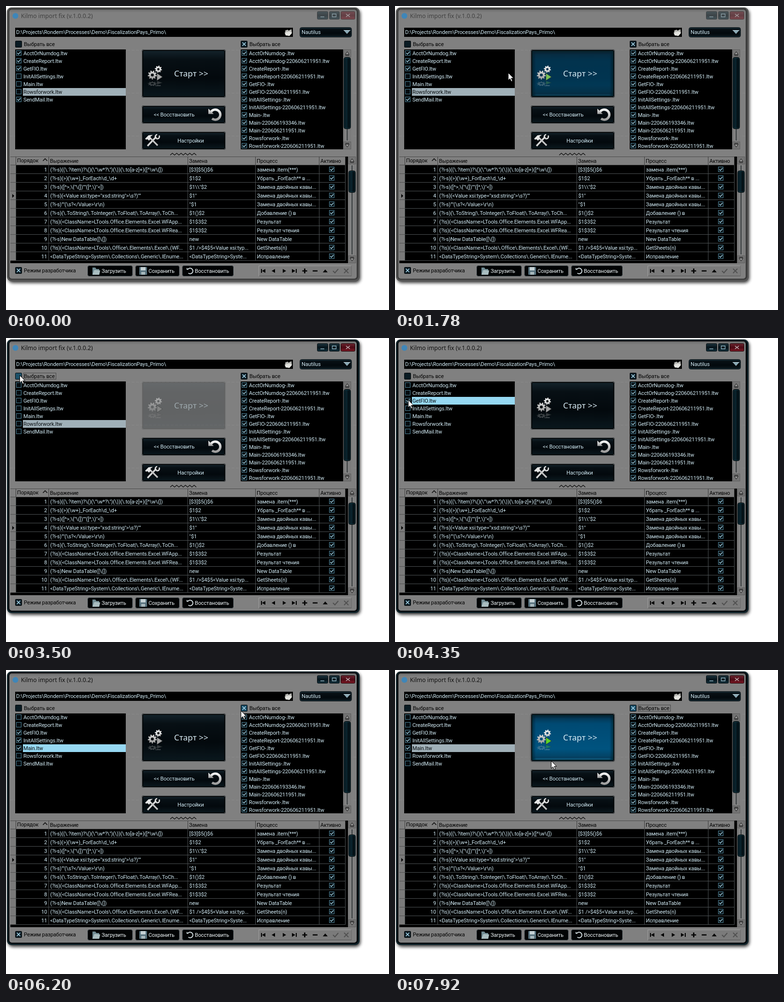
An HTML page for the animation above (8 s loop, 793 by 630 pixels).

```html
<!DOCTYPE html>
<html lang="ru">
<head>
<meta charset="utf-8">
<title>Import fix</title>
<style>
html, body { margin: 0; width: 100%; height: 100%; overflow: hidden; background: #fff; }
svg { display: block; width: 793px; height: 630px; }
text { font: 11px Roboto, "Noto Sans", sans-serif; letter-spacing: -.13px; white-space: pre; }
.title { font: 12.2px "Noto Sans", sans-serif; letter-spacing: 0; }
.big { font: 17px "Noto Sans", sans-serif; letter-spacing: 0; }
</style>
</head>
<body>
<svg id="stage" viewBox="0 0 793 630" xmlns="http://www.w3.org/2000/svg"></svg>
<script>
const INK = '#d3ecf6', LOOP = 8000;
const esc = s => String(s).replace(/&/g, '&amp;').replace(/</g, '&lt;').replace(/>/g, '&gt;');
const text = (x, y, s, fill = INK, more = '') => `<text x="${x}" y="${y}" fill="${fill}" ${more}>${esc(s)}</text>`;
const rect = (x, y, w, h, fill, more = '') => `<rect x="${x}" y="${y}" width="${w}" height="${h}" fill="${fill}" ${more}/>`;
const path = (d, fill, more = '') => `<path d="${d}" fill="${fill}" ${more}/>`;
const line = (d, color, w = 1, more = '') => path(d, 'none', `stroke="${color}" stroke-width="${w}" ${more}`);
const group = (id, body, more = '') => `<g id="${id}" ${more}>${body}</g>`;
const grad = (id, stops, more = 'x2="0" y2="1"') => `<linearGradient id="${id}" ${more}>` +
  stops.map(([o, c, a = 1]) => `<stop offset="${o}" stop-color="${c}" stop-opacity="${a}"/>`).join('') + '</linearGradient>';

const defs = `<defs>
  <filter id="soft" x="-10%" y="-10%" width="120%" height="120%"><feGaussianBlur stdDeviation="3.2"/></filter>
  <filter id="glow" x="-10%" y="-20%" width="120%" height="140%"><feGaussianBlur stdDeviation="2.5"/></filter>
  <clipPath id="mirror"><rect x="290" y="156" width="40" height="10"/></clipPath>` +
  grad('btn', [[0, '#13222a'], [.2, '#070f14'], [.6, '#03090d'], [1, '#0a171d']]) +
  grad('lit', [[0, '#062f47'], [.2, '#004a73'], [.75, '#00537f'], [1, '#053c5a']]) +
  grad('thumb', [[0, '#02090d'], [.35, '#0b2630'], [.6, '#06171e'], [1, '#010507']], 'x2="1" y2="0"') +
  grad('metal', [[0, '#f4f4f4'], [1, '#9c9c9c']]) +
  grad('cap', [[0, '#000', .75], [.5, '#333', .3], [1, '#555', 0]]) +
  grad('red', [[0, '#6b2630'], [.5, '#4b0a14'], [1, '#7d1a26']]) +
  grad('dark', [[0, '#1d343d'], [.5, '#05131a'], [1, '#12303b']]) + '</defs>';

// window frame and caption
const frame = (edge, mid, body) => rect(2, 3, 730, 567, edge, 'rx="9"') +
  rect(3.5, 4.5, 727, 564, 'none', `rx="8" stroke="${mid}" stroke-width="1.4"`) + rect(7, 7, 719, 558, body, 'rx="5"');

const captionButtons = rect(644.5, 11.5, 22, 16, 'url(#dark)', 'rx="2" stroke="#0a0f12"') +
  rect(669.5, 11.5, 21, 16, 'url(#dark)', 'rx="2" stroke="#0a0f12"') +
  rect(693.5, 11.5, 29, 16, 'url(#red)', 'rx="2" stroke="#1c0508"') +
  line('M651 22.5h8', '#8fb2c0', 1.5) + line('M675.5 16.5h8v6h-8z', '#8fb2c0', 1.3) +
  line('M704 16.5l8 6m0-6l-8 6', '#c8b8bc', 1.5);

const chrome = rect(4, 6, 730, 568, '#000', 'rx="10" opacity=".75" filter="url(#soft)"') +
  group('active', frame('#04090c', '#17363f', '#808080')) +
  group('idle', frame('#3c3c3c', '#666', '#808080')) +
  rect(7, 5, 719, 9, 'url(#cap)', 'opacity=".55"') +
  line('M8 91.5h717M8 180.5h717M8 269.5h717', '#919191', 1, 'stroke-dasharray="6 3" opacity=".55"') +
  '<circle cx="19.5" cy="20.5" r="6" fill="#3f86b8"/>' +
  text(31, 25, 'Kilmo import fix (v.1.0.0.2)', '#111', 'id="title" class="title"') +
  group('caption', captionButtons);

// check boxes
const tick = (x, y) => line(`M${x + 2.3} ${y + 5.3}l2.4 2.6 4.4-5`, '#9dcbdc', 1.5);
const box = (x, y, id, on = 1) => rect(x + .5, y + .5, 10, 10, '#050c10', 'stroke="#4f8499"') +
  `<g ${id ? `id="${id}"` : ''} ${on ? '' : 'visibility="hidden"'}>${tick(x, y)}</g>`;
const master = (x, y, id) => rect(x + .5, y + .5, 13, 13, '#0a1b23', `id="${id}Box" rx="1" stroke="#020507"`) +
  group(id + 'X', line(`M${x + 3.5} ${y + 3.5}l7 7m0-7l-7 7`, '#a4d3e8', 1.7));

// buttons
const face = (id, x, y, w, h) => group(id + 'Face',
  rect(x, y, w, h, '#161a1c', 'rx="4"') +
  rect(x + .5, y + .5, w - 1, h - 1, 'none', 'rx="4" stroke="#a0a5a7" stroke-opacity=".55"') +
  rect(x + 2.5, y + 2.5, w - 5, h - 5, 'url(#btn)', 'rx="2" stroke="#000"') +
  group(id + 'Lit', rect(x + 3, y + 3, w - 6, h - 6, 'url(#lit)', 'rx="2"') +
    rect(x + 4, y + 4, w - 8, h - 8, 'none', 'rx="2" stroke="#00131f" stroke-width="3" filter="url(#glow)"') +
    rect(x + 8, y + h - 7, w - 16, 2.5, '#1584b8', 'filter="url(#glow)"'), 'opacity="0"'));

function gear(cx, cy, r, teeth) {
  const pts = [];
  for (let i = 0; i < teeth * 4; i++) {
    const a = (i + .5) / (teeth * 4) * 2 * Math.PI, q = i % 4 < 2 ? r : r * .72;
    pts.push(`${(cx + q * Math.cos(a)).toFixed(1)} ${(cy + q * Math.sin(a)).toFixed(1)}`);
  }
  const h = r * .32;
  return `M${pts.join('L')}ZM${cx - h} ${cy}a${h} ${h} 0 1 0 ${2 * h} 0a${h} ${h} 0 1 0 ${-2 * h} 0Z`;
}
const loopArrow = (x, y, r, w, c) => line(`M${x - r * .8} ${y - r * .55}A${r} ${r} 0 1 1 ${x - r * .6} ${y + r * .8}`, c, w) +
  path(`M${x - r - w * .7} ${y - r - w * .35}v${w * 2.2}h${w * 2.2}z`, c);

const gears = group('gears', path(gear(303, 143, 9.5, 9) + gear(315.5, 131, 7.5, 8), 'url(#metal)', 'fill-rule="evenodd"') +
  path('M312.5 139.5v15l11.5-7.5z', '#a3a3a3', 'id="play" stroke="#2c3030" stroke-width=".8"'));
const buttons = face('start', 281, 90, 174, 100) +
  group('startBody', gears +
    '<g clip-path="url(#mirror)" opacity=".3"><use href="#gears" transform="translate(0 232.5) scale(1 -.5)"/></g>' +
    text(348, 146, 'Старт >>', '#dbeef7', 'class="big"')) +
  face('undo', 281, 206, 174, 38) +
  group('undoBody', text(306, 229, '<< Восстановить') + loopArrow(433, 225, 10.5, 5, 'url(#metal)')) +
  face('set', 281, 260, 174, 38) + text(355, 283, 'Настройки') +
  line('M293 290l18-19', '#d8d8d8', 3.4) + line('M297 272l17 17', '#c4c4c4', 3.2) +
  path('M288 275l7-7 9-1-5 4 1 4-4 4-3-3-3 1z', '#e6e6e6') +
  line('M317 268.5a4.3 4.3 0 1 1-4-2', '#e2e2e2', 2.6);

// scroll bars
const arrow = (x, y, dir) => rect(x - 7.5, y - 7.5, 15, 15, '#747474', 'stroke="#5d5d5d"') +
  path(`M${x - 4} ${y + 2.5 * dir}h8l-4 ${-6 * dir}z`, '#9a9a9a', 'stroke="#151515"') +
  line(`M${x - 4} ${y + 4.5 * dir}h8`, '#151515');
const scroll = (x, top, bottom, y, h) => rect(x, top, 17, bottom - top, '#7c7c7c') +
  rect(x + 6, top + 17, 5, bottom - top - 34, '#4e5152', 'rx="2.5" stroke="#a2a2a2"') +
  arrow(x + 8.5, top + 8, 1) + arrow(x + 8.5, bottom - 8, -1) +
  rect(x + 1.5, y + .5, 14, h, 'url(#thumb)', 'rx="4" stroke="#000"') +
  rect(x + 2.5, y + 1.5, 12, h - 2, 'none', 'rx="3" stroke="#1b4552" stroke-opacity=".8"');

// lists
const leftNames = 'AcctOrNumdog CreateReport GetFIO InitAllSettings Main Rowsforwork SendMail'.split(' ');
const stamp = '220606211951';
const rightNames = [];
for (const n of leftNames.slice(0, 6)) {
  rightNames.push(n + '-');
  if (n === 'Main') rightNames.push('Main-220606193346');
  rightNames.push(n + '-' + stamp);
}
const focus = (id, x) => rect(x + .5, 72.5, 67, 13, 'none', `id="${id}" stroke="#111" stroke-dasharray="1 1"`);
const lists = rect(19, 45, 575, 19, '#000') +
  text(21, 58, String.raw`D:\Projects\Rondem\Processes\Demo\FiscalizationPays_Primo` + '\\') +
  path('M578 51l5-2 2 2 6-3 1 8-6 6-7-3z', '#b9b9b5') + path('M577 55l11-2 4 3-5 6-8-1z', '#e4e4df') +
  rect(608.5, 44.5, 107, 20, 'url(#btn)', 'rx="4" stroke="#0a0d0f"') +
  rect(609.5, 45.5, 105, 18, 'none', 'rx="3" stroke="#24424d" stroke-opacity=".7"') +
  text(612, 58, 'Nautilus') + path('M699 50h14l-7 8z', '#8aa9b5') + line('M699 50.5h14', '#c6dbe3') +
  master(19, 72, 'left') + text(37, 83, 'Выбрать все', '#000') + focus('leftFocus', 36) +
  master(486, 72, 'right') + text(504, 83, 'Выбрать все', '#000') + focus('rightFocus', 503) +
  rect(19, 90, 229, 207, '#000') + rect(35, 90, 213, 16, '#a0b0b8', 'id="pick"') +
  leftNames.map((n, i) => box(21, 92 + 16 * i, 'tick' + i) + text(36, 102 + 16 * i, n + '.ltw', INK, `id="name${i}"`)).join('') +
  rect(486, 90, 213, 207, '#000') +
  rightNames.map((n, i) => box(488, 92 + 16 * i) .replace('<g  ', '<g class="rt" ') + text(503, 102 + 16 * i, n + '.ltw')).join('') +
  scroll(698, 90, 297, 106, 148) +
  line('M340 309l4.5-4 4.5 4 4.5-4 4.5 4 4.5-4 4.5 4 4.5-4 4.5 4 4.5-4 4.5 4 4.5-4 4.5 4', '#0a0a0a', 1.2);

// rule table
const cls = '(?is)(<ClassName>LTools';
const rules = [
  [String.raw`(?i-s)((\.?item)?\()(\"\w*?\")(\))(\.to[a-z]+)([^\w\(])`, '[$3]$5()$6', 'замена .item(***)'],
  [String.raw`(?i-s)(>)(\w+)_ForEach\d_\d+`, '$1$2', 'Убрать _ForEach** в ...'],
  [String.raw`(?i-s)([^>,\{"\(])""([^,\)"<])`, String.raw`$1\\"$2`, 'Замена двойных кавы...'],
  [String.raw`(?i-s)(<Value xsi:type="xsd:string">\s?)""`, '$1"', 'Замена двойных кавы...'],
  [String.raw`(?i-s)""(\s?</Value>\r\n)`, '"$1', 'Замена двойных кавы...'],
  [String.raw`(?i-s)(\.ToString|\.ToInteger|\.ToFloat|\.ToArray|\.ToCh...`, '$1()$2', 'Добавление () в'],
  [cls + '.Office.Elements.Excel.WFApp...', '$1$3$2', 'Результат'],
  [cls + '.Office.Elements.Excel.WFRea...', '$1$3$2', 'Результат чтения'],
  [String.raw`(?i-s)New DataTable([\(])`, 'new', 'New DataTable'],
  [cls + String.raw`\.Office\.Elements\.Excel\.(WF...`, '$1 />$4$5<Value xsi:typ...', 'GetSheets(n)'],
  [String.raw`<DataTypeString>System\.Collections\.Generic\.IEnume...`, '<DataTypeString>Syste...', 'Исправление']
];
const cols = [20, 88, 376, 516, 648, 702];
const table = rect(9, 312, 716, 221, '#000') + rect(9, 312, 694, 18, '#808080') + rect(9, 330, 11, 198, '#7a7a7a') +
  line('M9 312.5h694M9 329.5h694', '#4b4b4b') +
  cols.map(x => line(`M${x + .5} 312v17`, '#3c3c3c') + line(`M${x + .5} 330v198`, '#4c5153')).join('') +
  ['Порядок', 'Выражение', 'Замена', 'Процесс', 'Активно'].map((s, i) => text(cols[i] + 3, i ? 325 : 324, s, '#000')).join('') +
  line('M76.5 321l4.5-4.5 4.5 4.5', '#111', 1.6) +
  rules.map((r, i) => {
    const y = 343 + 18 * i;
    return line(`M20 ${y + 4.5}h682`, '#4c5153') + line(`M9 ${y + 4.5}h11`, '#4f4f4f') +
      text(85, y, i + 1, INK, 'text-anchor="end"') + r.map((s, k) => text(cols[k + 1] + 3.5, y, s)).join('') + box(669, y - 10);
  }).join('') +
  path('M13 389.5v8l4-4z', '#000') + scroll(708, 312, 533, 341, 45);

// bottom bar
const small = (x, w, tx, s) => rect(x, 538, w, 22, '#020405', 'rx="4"') +
  rect(x + .5, 538.5, w - 1, 21, 'none', 'rx="4" stroke="#2b3a40" stroke-opacity=".7"') + text(tx, 553, s, '#f2f8fa');
const skip = (x, d) => path(`M${x - 3 * d} 545v8l${7 * d}-4z`, '#000');
const bottom = master(19, 541, 'dev') + text(37, 552, 'Режим разработчика', '#000') +
  small(169, 93, 198, 'Загрузить') + small(268, 91, 295, 'Сохранить') + small(365, 106, 391, 'Восстановить') +
  path('M179 542h6l2 3h6v12h-14z', '#6f8a92') + path('M183 547l12 1-2 9h-14z', '#a9bdc0') +
  rect(276, 541, 16, 16, '#56707c', 'rx="1"') + rect(279, 541, 10, 7, '#c3d0d4') + rect(280, 551, 8, 6, '#a5b6bb') +
  loopArrow(381, 549, 5.8, 1.8, '#dce6ea') +
  rect(523.5, 538.5, 191, 21, '#7b7b7b', 'stroke="#a0a0a0"') + line('M524 559.5h191v-21', '#565656') +
  skip(534, -1) + rect(528, 545, 2, 8, '#000') + skip(554, -1) + skip(576, 1) + skip(595, 1) + rect(600, 545, 2, 8, '#000') +
  line('M613.5 549h10M618.5 544v10M635 549h10', '#000', 2.6) + path('M656 552h10l-5-6z', '#000') +
  line('M677 549l4 4 7-8', '#505050', 2) + line('M700 544.5l9 9m0-9l-9 9', '#505050', 1.8);

const pointer = '<circle id="halo" r="12" fill="#e6da00" opacity=".62"/>' +
  path('M.5.5V16l3.6-3.4 2.6 5.9 2.5-1.1-2.5-5.7h4.9z', '#fff', 'id="mouse" stroke="#000" stroke-width="1"');

document.getElementById('stage').innerHTML = defs + chrome + lists + buttons + table + bottom + pointer;

const el = {};
document.querySelectorAll('[id]').forEach(e => el[e.id] = e);
const rightTicks = document.querySelectorAll('.rt');
const show = (e, on) => e.setAttribute('visibility', on ? 'visible' : 'hidden');
const set = (e, k, v) => e.setAttribute(k, v);
const within = (t, spans) => spans.some(([a, b]) => t >= a && t < b);

// first step, last step, step count, where the pointer ends, ease out
const moves = [
  [450, 1240, 11, 417, 184, 1], [1320, 2100, 11, 82, 100], [2170, 2480, 5, 29, 77, 1], [2880, 2880, 1, 28, 77],
  [3730, 3960, 4, 27, 128], [4580, 4730, 3, 28, 144], [5050, 5350, 4, 32, 163, 1],
  [5430, 5890, 7, 573, 96, 1], [5970, 6200, 4, 486, 84, 1], [6280, 6430, 3, 492, 78],
  [6810, 6810, 1, 496, 83], [6890, 6890, 1, 491, 78], [7300, 7920, 9, 323, 188, 1]
];
function mouseAt(t) {
  let x = 705, y = 630;
  for (const [a, b, n, tx, ty, ease] of moves) {
    if (t < a) break;
    const i = n > 1 ? Math.floor((t - a) * (n - 1) / (b - a) + .02) : 0;
    let p = Math.min(1, (i + 1) / n);
    if (ease) p *= 2 - p;
    x += (tx - x) * p;
    y += (ty - y) * p;
  }
  return [Math.round(x), Math.round(y)];
}

function ramp(t, pts) {
  for (let i = 1; i < pts.length; i++) {
    const [a, u] = pts[i - 1], [b, v] = pts[i];
    if (t < b) return t < a ? u : u + (v - u) * (t - a) / (b - a);
  }
  return pts[pts.length - 1][1];
}
const startGlow = [[1080, 0], [1240, .7], [1400, .95], [1630, .95], [2050, 0], [5520, 0], [5680, .5], [6120, 0], [7380, 0], [7700, 1], [8000, 1]];
const undoGlow = [[960, 0], [1090, .7], [1240, .45], [1500, 0]];
const startOn = [[3499, 1], [3500, 0], [4110, 0], [4270, 1]];
const undoOn = [[6579, 1], [6580, .3], [6660, 0], [7130, 0], [7135, 1]];
const clicks = [[2400, 2630], [3350, 3500], [4110, 4350], [4810, 5050], [5350, 5430], [6430, 6580], [7060, 7130]];

function ticked(i, t) {
  if (t < 2570) return i < 3 || i === 6;
  if (t < 3500) return true;
  return t >= [9e9, 9e9, 4110, 4810, 5350, 9e9, 9e9][i];
}

function draw(t) {
  const active = t >= 2400;
  show(el.active, active);
  show(el.idle, !active);
  set(el.title, 'fill', active ? '#111' : '#404040');
  set(el.caption, 'opacity', active ? 1 : .55);

  const row = t < 4110 ? 5 : t < 4810 ? 2 : t < 5350 ? 3 : 4;
  set(el.pick, 'y', 90 + 16 * row);
  set(el.pick, 'fill', t >= 4110 && t < 6430 ? '#96d8f2' : '#a0b0b8');
  leftNames.forEach((n, i) => {
    show(el['tick' + i], ticked(i, t));
    set(el['name' + i], 'fill', i === row ? '#0a0f12' : INK);
  });
  const all = !within(t, [[6580, 7130]]);
  rightTicks.forEach(e => show(e, all));
  show(el.rightX, all);
  show(el.leftX, within(t, [[2570, 3500]]));
  show(el.leftFocus, within(t, [[2570, 4110]]));
  show(el.rightFocus, t >= 6580);
  set(el.leftBox, 'fill', within(t, [[2320, 3800]]) ? '#1c5068' : '#0a1b23');
  set(el.rightBox, 'fill', t >= 6200 ? '#174a63' : '#0a1b23');

  const lit = ramp(t, startGlow);
  set(el.startLit, 'opacity', lit);
  set(el.undoLit, 'opacity', ramp(t, undoGlow));
  set(el.play, 'fill', `rgb(${163 - 70 * lit},${163 + 50 * lit},${163 - 125 * lit})`);
  for (const [id, pts] of [['start', startOn], ['undo', undoOn]]) {
    const on = ramp(t, pts);
    set(el[id + 'Face'], 'opacity', .24 + .76 * on);
    set(el[id + 'Body'], 'opacity', .5 + .5 * on);
  }

  const [x, y] = mouseAt(t);
  show(el.mouse, t >= 450);
  set(el.mouse, 'transform', `translate(${x} ${y})`);
  show(el.halo, within(t, clicks));
  set(el.halo, 'cx', x);
  set(el.halo, 'cy', y);
}

const begin = performance.now();
function tickFrame() {
  draw((performance.now() - begin) % LOOP);
  requestAnimationFrame(tickFrame);
}
tickFrame();
</script>
</body>
</html>
```
